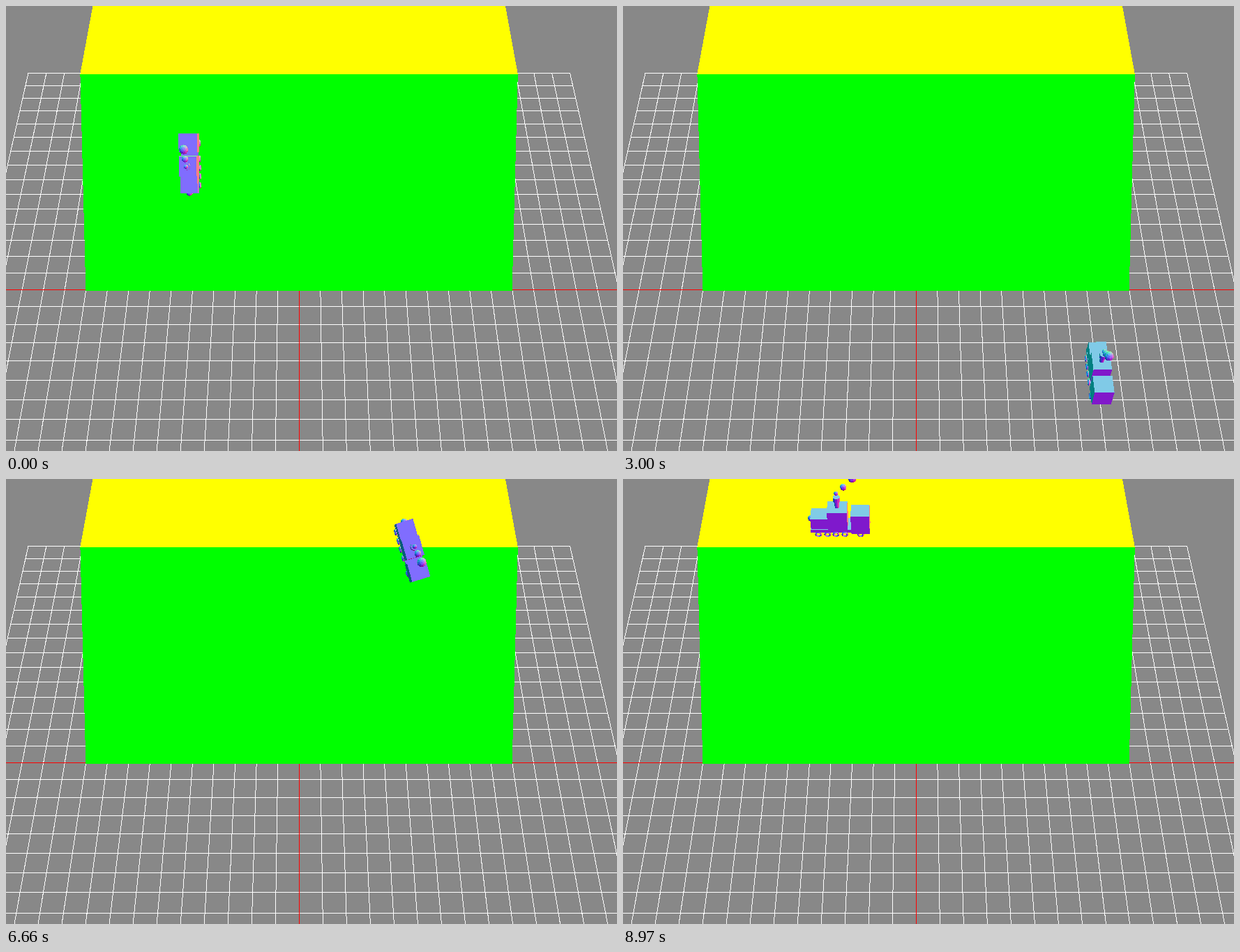
Write an HTML page that moves like this. It is 876 px wide and 639 px high and loops after 9.04 s.

```html
<!DOCTYPE html>
<html lang="en">
<head>
<meta charset="utf-8">
<title>Train on a ramp</title>
<style>
  html, body { margin: 0; width: 100%; height: 100%; overflow: hidden; background: #888; }
  svg { display: block; width: 100%; height: 100%; }
</style>
</head>
<body>
<svg viewBox="0 0 876 639" shape-rendering="crispEdges">
  <rect width="876" height="639" fill="#888"/>
  <path id="grid" stroke="#fff" fill="none"/>
  <path id="axes" stroke="#f00" fill="none"/>
  <path d="M124.4 0H716L733.8 97.5H106.4Z" fill="#ff0"/>
  <path d="M106.4 97.5H733.8L725.6 409H114.4Z" fill="#0f0"/>
  <g id="train"></g>
</svg>
<script>
const LOOP = 9040, STEP = 70, LAST = 128;
const FOCAL = 1527.5, CX = 420.3, CY = 407.2;
const CAMERA = [0, 40, 30];
const TAU = Math.PI * 2, RAD = Math.PI / 180;
const $ = id => document.getElementById(id);

// Camera looks at the origin from (0, 40, 30).
const toView = ([x, y, z]) => [x, 0.6 * y - 0.8 * z, 0.8 * y + 0.6 * z];
function project(p) {
  const [x, y, d] = toView(p), s = FOCAL / (50 - d);
  return (CX + x * s).toFixed(2) + ' ' + (CY - y * s).toFixed(2);
}
const sub = (a, b) => a.map((v, i) => v - b[i]);
const dot = (a, b) => a[0] * b[0] + a[1] * b[1] + a[2] * b[2];
const cross = (a, b) => [
  a[1] * b[2] - a[2] * b[1], a[2] * b[0] - a[0] * b[2], a[0] * b[1] - a[1] * b[0]];
const mean = pts => [0, 1, 2].map(i => pts.reduce((s, p) => s + p[i], 0) / pts.length);

function drawGrid() {
  const line = (a, b) => `M${project(a)}L${project(b)}`;
  let white = '', red = '';
  for (let i = -15; i <= 15; i++) {
    const pair = line([i, 0, -15], [i, 0, 15]) + line([-15, 0, i], [15, 0, i]);
    if (i) white += pair; else red += pair;
  }
  $('grid').setAttribute('d', white);
  $('axes').setAttribute('d', red);
}

// Train model: u runs forward, h up, w to the right.
const faces = [];
const at = (u, h, w) => [w, h, -u];

function addFace(pts, inside, paint) {
  const n = cross(sub(pts[2], pts[0]), sub(pts[3], pts[1]));
  const mid = mean(pts);
  const len = Math.hypot(...n) * (dot(n, sub(mid, inside)) < 0 ? -1 : 1);
  const normal = n.map(v => v / len);
  faces.push({ pts, mid, normal, paint: paint || normal });
}

function box(u0, u1, h0, h1, w) {
  const inside = at((u0 + u1) / 2, (h0 + h1) / 2, 0);
  const quad = (...list) => addFace(list.map(c => at(...c)), inside);
  for (const u of [u0, u1]) quad([u, h0, -w], [u, h1, -w], [u, h1, w], [u, h0, w]);
  for (const h of [h0, h1]) quad([u0, h, -w], [u1, h, -w], [u1, h, w], [u0, h, w]);
  for (const s of [-w, w]) quad([u0, h0, s], [u1, h0, s], [u1, h1, s], [u0, h1, s]);
}

// Solid of revolution around a vertical axis; profile holds [height, radius].
function lathe(u, profile) {
  const inside = at(u, (profile[0][0] + profile[profile.length - 1][0]) / 2, 0);
  const n = 10;
  const point = ([h, r], i) => at(u + r * Math.cos(i * TAU / n), h, r * Math.sin(i * TAU / n));
  for (let k = 1; k < profile.length; k++) {
    const a = profile[k - 1], b = profile[k];
    for (let i = 0; i < n; i++) {
      addFace([point(a, i), point(a, i + 1), point(b, i + 1), point(b, i)], inside);
    }
  }
}
const tube = (u, h0, h1, r) => lathe(u, [[h0, 0], [h0, r], [h1, r], [h1, 0]]);
const ball = (u, h, r) => lathe(u, Array.from({ length: 7 }, (_, k) =>
  [h + r * Math.cos(k * Math.PI / 6), r * Math.sin(k * Math.PI / 6)]));

function wheel(u, w) {
  const R = 0.115, m = 0.045, n = 10;
  const point = (i, j, t = m) => {
    const a = i * TAU / n, b = j * TAU / 4, r = R + t * Math.cos(b);
    return at(u + r * Math.cos(a), 0.16 + r * Math.sin(a), w + t * Math.sin(b));
  };
  for (let i = 0; i < n; i++) for (let j = 0; j < 4; j++) {
    addFace([point(i, j), point(i + 1, j), point(i + 1, j + 1), point(i, j + 1)],
      point(i + 0.5, 0, 0));
  }
}

function cabWindow(w) {
  addFace([[-0.2, 0.68], [0.2, 0.68], [0.2, 1.02], [-0.2, 1.02]].map(([u, h]) => at(u, h, w)),
    at(0, 0.85, 0), [0, 1, 0]);
}

function buildTrain() {
  box(-1.45, -0.61, 0.17, 1.17, 0.42);
  box(-0.65, 1.25, 0.25, 0.42, 0.4);
  box(-0.45, 0.45, 0.42, 1.39, 0.4);
  box(0.45, 1.22, 0.42, 1.0, 0.39);
  tube(0, 1.39, 1.72, 0.1);
  tube(0, 1.72, 1.95, 0.16);
  ball(1.22, 0.74, 0.15);
  ball(0, 2.15, 0.1);
  ball(-0.34, 2.5, 0.15);
  ball(-0.76, 3.0, 0.2);
  for (const side of [-1, 1]) {
    cabWindow(side * 0.41);
    for (const u of [-1.03, -0.31, 0.1, 0.48, 0.9]) wheel(u, side * 0.43);
  }
}

// time, x, y, z, heading, pitch
const route = [
  [0, -5, 4.1, -4.1, -180, 45],
  [1010, -5, 0, 0, -180, 45],
  [1960, -3, 0, 5, -90, 0],
  [2890, 8, 0, 5, 0, 0],
  [2975, 8, 0, 5, 0, 0],
  [4250, 8, 0, 0, 16.7, 45],
  [4522, 8, 0, 0, 16.7, 45],
  [6682, 5, 7.07, -7.07, 16.7, 45],
  [7200, 5, 7.07, -8.1, 90, 0],
  [9253, -5, 7.07, -8.1, 90, 0]
];
function poseAt(t) {
  const i = route.findIndex(k => k[0] > t);
  const a = route[i - 1], b = route[i], f = (t - a[0]) / (b[0] - a[0]);
  return a.map((v, j) => v + (b[j] - v) * f).slice(1);
}

function render(t) {
  const [px, py, pz, heading, pitch] = poseAt(t);
  const ch = Math.cos(heading * RAD), sh = Math.sin(heading * RAD);
  const cp = Math.cos(pitch * RAD), sp = Math.sin(pitch * RAD);
  const turn = ([x, y, z]) => {
    const side = x * ch + z * sh, along = z * ch - x * sh;
    return [side, y * cp - along * sp, y * sp + along * cp];
  };
  const place = p => {
    const [x, y, z] = turn(p);
    return [x + px, y + py, z + pz];
  };
  const shown = [];
  for (const f of faces) {
    const toEye = sub(CAMERA, place(f.mid));
    if (dot(turn(f.normal), toEye) > 0) shown.push({ f, dist: Math.hypot(...toEye) });
  }
  shown.sort((a, b) => b.dist - a.dist);
  $('train').innerHTML = shown.map(({ f }) => {
    const rgb = toView(turn(f.paint)).map(v => Math.round(127.5 * (v + 1)));
    return `<path fill="rgb(${rgb})" d="M${f.pts.map(p => project(place(p))).join('L')}Z"/>`;
  }).join('');
}

let start, shownStep = -1;
function tick() {
  const now = performance.now();
  if (start === undefined) start = now;
  const step = Math.min(LAST, Math.floor(((now - start) % LOOP + 20) / STEP));
  if (step !== shownStep) render((shownStep = step) * STEP);
  requestAnimationFrame(tick);
}

drawGrid();
buildTrain();
tick();
</script>
</body>
</html>
```
